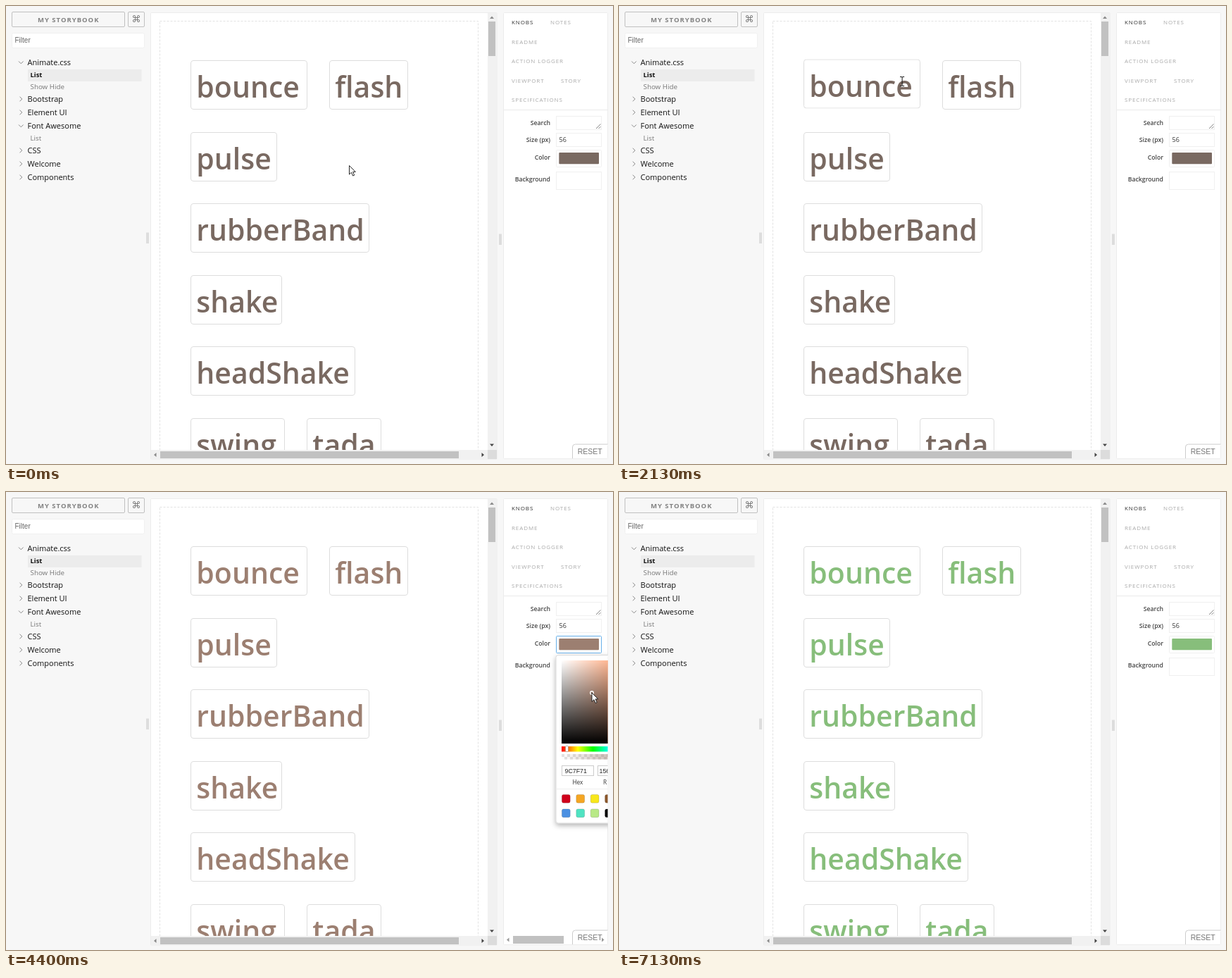
These frames come from a looping animation (862 by 650 pixels, 7790 ms). An HTML page:

```html
<!DOCTYPE html>
<html lang="en">
<head>
<meta charset="utf-8">
<title>Component explorer</title>
<style>
html, body { margin: 0; width: 100%; height: 100%; overflow: hidden; background: #f7f7f7; }
svg { display: block; }
text { font-family: "Open Sans", "Noto Sans", sans-serif; white-space: pre; }
.arial { font-family: "Liberation Sans", Arial, sans-serif; }
.tag text { font-size: 41px; font-weight: 600; fill: currentColor; }
.tag rect { fill: #fff; stroke: #ddd; }
.tag { transform-box: fill-box; transform-origin: center; }
.item { font-size: 11px; fill: #111; }
.sub { font-size: 9.8px; fill: #777; }
.tab { font-size: 8px; letter-spacing: .9px; fill: #aaa; }
.label { font-size: 8.7px; font-weight: 600; fill: #444; text-anchor: end; }
.field { fill: #fff; stroke: #f0f0f0; }
.entry { fill: #fff; stroke: #ccc; }
.panel { fill: #fff; stroke: #ececec; }
.track { fill: #f1f1f1; }
.thumb { fill: #c1c1c1; }
.chevron { fill: none; stroke: #888; }
.cursor { fill: #fff; stroke: #111; stroke-width: .9; stroke-linejoin: round; }
</style>
</head>
<body>
<svg id="stage" width="862" height="650" viewBox="0 0 862 650">
  <defs>
    <clipPath id="viewClip"><rect x="206" y="10" width="478" height="620"/></clipPath>
    <clipPath id="sideClip"><rect x="707" y="10" width="147.5" height="632"/></clipPath>
    <linearGradient id="white"><stop stop-color="#fff"/><stop offset="1" stop-color="#fff" stop-opacity="0"/></linearGradient>
    <linearGradient id="black" x1="0" y1="1" x2="0" y2="0"><stop/><stop offset="1" stop-opacity="0"/></linearGradient>
    <linearGradient id="hues">
      <stop stop-color="#f00"/><stop offset=".17" stop-color="#ff0"/><stop offset=".33" stop-color="#0f0"/>
      <stop offset=".5" stop-color="#0ff"/><stop offset=".67" stop-color="#00f"/><stop offset=".83" stop-color="#f0f"/><stop offset="1" stop-color="#f00"/>
    </linearGradient>
    <linearGradient id="alpha"><stop stop-color="currentColor" stop-opacity="0"/><stop offset="1" stop-color="currentColor"/></linearGradient>
    <pattern id="checks" x="789" y="372" width="8" height="8" patternUnits="userSpaceOnUse">
      <rect width="8" height="8" fill="#fff"/><path d="M0 0h4v8h4V4H0z" fill="#e2e2e2"/>
    </pattern>
    <filter id="shadow" x="-20%" y="-20%" width="140%" height="140%">
      <feDropShadow dx="0" dy="3" stdDeviation="3.5" flood-opacity=".3"/>
    </filter>
  </defs>

  <rect width="862" height="650" fill="#f7f7f7"/>

  <!-- navigation -->
  <g fill="#f7f7f7" stroke="#c1c1c1">
    <rect x="8.5" y="8.5" width="160" height="21" rx="1.5"/>
    <rect x="173.5" y="8.5" width="23" height="21" rx="1.5"/>
  </g>
  <text x="45" y="22.7" font-size="9.5" font-weight="700" letter-spacing="1" fill="#828282">MY STORYBOOK</text>
  <text x="184.8" y="23.2" font-size="13" text-anchor="middle" fill="#777" style="font-family:'DejaVu Sans',sans-serif">⌘</text>
  <rect x="8.5" y="38.5" width="188" height="21" rx="2" class="field"/>
  <text class="arial" x="12.5" y="52" font-size="10" fill="#666">Filter</text>
  <rect x="31" y="90" width="161.5" height="17" fill="#ececec"/>
  <g id="tree"></g>
  <path d="M199 321.5h4V337h-4zM700 323.5h4V339h-4z" fill="#ddd"/>

  <!-- preview -->
  <rect class="panel" x="205.5" y="9.5" width="491.5" height="633.5" rx="1"/>
  <g clip-path="url(#viewClip)">
    <rect x="218.5" y="21.5" width="452" height="700" fill="none" stroke="#e2e2e2" stroke-dasharray="3 2"/>
    <g id="tags"></g>
  </g>
  <path class="track" d="M684 10h13v620h-13zM206 630h478v13H206z"/>
  <rect x="684" y="630" width="13" height="13" fill="#dcdcdc"/>
  <path class="thumb" d="M685 22h10v49h-10zM219 632h424v10H219z"/>
  <path d="M687 18h6l-3-3.5zM213.5 634v6l-3.5-3z" fill="#8a8a8a"/>
  <path d="M687 621.5h6l-3 3.5zM675.5 634v6l3.5-3z" fill="#444"/>

  <!-- addons -->
  <rect class="panel" x="706.5" y="9.5" width="148" height="633" rx="1"/>
  <path d="M707 147.5h147" stroke="#eaeaea"/>
  <g id="tabs"></g>
  <g id="labels"></g>
  <g class="field">
    <rect x="781.5" y="156.5" width="64" height="19"/>
    <rect x="781.5" y="180.5" width="64" height="19"/>
    <rect id="colorField" x="781.5" y="204.5" width="64" height="24" rx="1"/>
    <rect x="781.5" y="235.5" width="64" height="25"/>
  </g>
  <path d="M838 174l6.5-6.5M841.5 174l3-3" stroke="#777" stroke-width=".9"/>
  <text x="785.5" y="193.3" font-size="9" fill="#333">56</text>
  <rect x="785.3" y="208" width="56.7" height="16.3" rx="1" fill="currentColor"/>
  <g clip-path="url(#sideClip)">
    <path d="M804.5 643v-17q0-4 4-4H860" fill="#fff" stroke="#ccc"/>
    <text class="arial" x="811.7" y="636" font-size="10.5" fill="#777">RESET</text>
    <g id="popup">
      <rect class="thumb" x="720" y="630" width="72" height="11"/>
      <path d="M714.5 632.5v6l-3.5-3zM846 632.5v6l3.5-3z" fill="#999"/>
      <rect x="781" y="231.5" width="172" height="238.5" rx="3" fill="#fff" stroke="#d0d0d0" stroke-width=".8" filter="url(#shadow)"/>
      <rect id="shade" x="789" y="239" width="156" height="118"/>
      <rect x="789" y="239" width="156" height="118" fill="url(#white)"/>
      <rect x="789" y="239" width="156" height="118" fill="url(#black)"/>
      <circle id="marker" r="2.3" fill="none" stroke="#fff" stroke-width="1.3"/>
      <rect x="789" y="361" width="135" height="7.5" fill="url(#hues)"/>
      <rect id="huePin" y="360.5" width="4" height="8" rx="1" fill="#fff" stroke="#777" stroke-width=".5"/>
      <rect x="789" y="372" width="135" height="7.5" fill="url(#checks)"/>
      <rect x="789" y="372" width="135" height="7.5" fill="url(#alpha)"/>
      <rect class="entry" x="789.5" y="388.5" width="45" height="14"/>
      <rect class="entry" x="840.5" y="388.5" width="26" height="14"/>
      <g font-size="8.8" fill="#222">
        <text class="arial" id="hex" x="793.5" y="399"></text>
        <text class="arial" id="red" x="842.5" y="399"></text>
      </g>
      <g font-size="8.3" fill="#333"><text x="804.5" y="415">Hex</text><text x="848" y="415">R</text></g>
      <path d="M782 421.5h80" stroke="#eee"/>
      <g id="presets" stroke="#000" stroke-opacity=".18" stroke-width=".8"></g>
    </g>
  </g>

  <g id="cursor" class="cursor">
    <path d="M.5.5V13l3-2.8 2.1 4.8 2.1-.9-2.1-4.7H9.3z"/>
    <path d="M-3-6.5H-1L0-6 1-6.5H3M0-6V6M-3 6.5H-1L0 6 1 6.5H3" fill="none" stroke-width="1"/>
    <path d="M-1.5.5q1.5-1.5 2.7 0v5q2-.8 2.4.6 2-.6 2.4.7 1.8-.3 1.8 1.5v4q0 2-1.3 3.5V18H-.5v-1.7L-4.8 11q-.9-2 .8-2.2l2.5 1.9z"/>
  </g>
</svg>
<script>
const LOOP = 7790, FRAME = 1000 / 15, OPEN = 3667, HUE_CLICK = 5267, CLOSE = 6467;
const $ = id => document.getElementById(id);

function add(parent, name, attrs, content) {
  const el = document.createElementNS("http://www.w3.org/2000/svg", name);
  for (const key in attrs) el.setAttribute(key, attrs[key]);
  if (content) el.textContent = content;
  return parent.appendChild(el);
}
const label = (id, cls, x, y, text, style = "") => add($(id), "text", { class: cls, x, y, style }, text);

for (const [text, y, open] of [["Animate.css", 84, 1], ["Bootstrap", 136], ["Element UI", 155],
  ["Font Awesome", 174, 1], ["CSS", 209], ["Welcome", 228], ["Components", 247]]) {
  label("tree", "item", 30.5, y, text);
  add($("tree"), "path", { class: "chevron", d: open ? `M18 ${y - 5.5}l3.3 3.3 3.3-3.3` : `M19.5 ${y - 7.3}l3.3 3.3-3.3 3.3` });
}
label("tree", "sub", 34.5, 101.3, "List", "font-weight:700;font-size:9.4px;fill:#111");
label("tree", "sub", 34.5, 118, "Show Hide");
label("tree", "sub", 34.5, 191, "List");

for (const [text, x, y] of [["KNOBS", 718, 26], ["NOTES", 773, 26], ["README", 718, 53.5],
  ["ACTION LOGGER", 718, 81], ["VIEWPORT", 718, 108.5], ["STORY", 788, 108.5], ["SPECIFICATIONS", 718, 136]])
  label("tabs", "tab", x, y, text, text === "KNOBS" ? "fill:#333" : "");

for (const [text, y] of [["Search", 169.3], ["Size (px)", 193.3], ["Color", 218], ["Background", 249.3]])
  label("labels", "label", 773, y, text);

const tags = {};
for (const [name, x, y, width] of [["bounce", 262, 77, 166], ["flash", 459, 77, 112], ["pulse", 262, 179, 123],
  ["rubberBand", 262, 280, 254], ["shake", 262, 382, 130], ["headShake", 262, 483, 234],
  ["swing", 262, 585, 134], ["tada", 427, 585, 106]]) {
  const g = tags[name] = add($("tags"), "g", { class: "tag" });
  add(g, "rect", { x: x + .5, y: y + .5, width: width - 1, height: 69, rx: 3.5 });
  add(g, "text", { x: x + 8.3, y: y + 53.2 }, name);
}

["#d0021b", "#f5a623", "#f8e71c", "#8b572a", "#4a90e2", "#50e3c2", "#b8e986", "#000"].forEach((fill, i) =>
  add($("presets"), "rect", { x: 789.4 + i % 4 * 20.4, y: i < 4 ? 429.4 : 449.9, width: 11.8, height: 11.8, rx: 2.3, fill }));

// Hover effects, active from pointer entry to pointer exit
const OUT = "cubic-bezier(.215,.61,.355,1)", IN = "cubic-bezier(.755,.05,.855,.06)";
const lift = (offset, y, easing = OUT) => ({ offset, easing, transform: `translateY(${-y}px)` });
const fade = opacity => ({ opacity, easing: "ease" });
const grow = s => ({ transform: `scale(${s})`, easing: "ease" });
const hovers = [
  ["pulse", 1060, 1240, [grow(1), grow(1.05), grow(1)]],
  ["bounce", 1315, 2315, [lift(0, 0), lift(.2, 0), lift(.4, 24, IN), lift(.43, 24, IN), lift(.53, 0),
    lift(.7, 12, IN), lift(.8, 0), lift(.9, 3.2), lift(1, 0)]],
  ["flash", 2250, 2990, [fade(1), fade(0), fade(1), fade(0), fade(1)]]
].map(([name, from, to, frames]) => {
  const anim = tags[name].animate(frames, 1000);
  anim.pause();
  return { anim, from, to };
});

// Pointer path: time, x, y, shape (0 arrow, 1 text, 2 hand)
const path = [
  [733, 487, 226, 0], [933, 440, 258, 0], [1067, 384, 240, 1], [1200, 374, 185, 0], [1333, 380, 142, 1],
  [1467, 389.5, 106, 1], [1600, 391, 106, 1], [2000, 394, 106, 1], [2133, 402, 107, 1], [2200, 427, 108, 0], [2267, 462, 110, 1],
  [2400, 486, 114, 1], [2600, 490, 115, 1], [2867, 491, 115, 1], [2933, 530, 126, 1], [3000, 592, 148, 0],
  [3133, 764, 201, 0], [3200, 788, 209, 2], [3333, 810, 216, 2], [3533, 815.5, 216, 2], [3933, 815.5, 216, 2],
  [4067, 817, 248, 0], [4267, 820, 301, 0], [4533, 843, 268, 0], [4733, 844, 349, 0], [4933, 827, 361, 0],
  [5133, 830, 363, 0], [5600, 830, 363, 0], [5667, 834, 361, 0], [6000, 753, 354, 0], [6600, 753, 354, 0], [7133, 33, 652, 0]
];
const mix = (a, b, p) => a + (b - a) * Math.min(1, Math.max(0, p));

function pointer(t) {
  const i = Math.max(0, path.findLastIndex(p => p[0] <= t + 1));
  const a = path[i], b = path[i + 1] || a;
  const p = b === a ? 0 : (t - a[0]) / (b[0] - a[0]);
  return [mix(a[1], b[1], p), mix(a[2], b[2], p), a[3]];
}

function hsvToRgb(h, s, v) {
  return [5, 3, 1].map(n => {
    const k = (n + h / 60) % 6;
    return Math.round(255 * v * (1 - s * Math.max(0, Math.min(k, 4 - k, 1))));
  });
}

function render(t) {
  for (const { anim, from, to } of hovers) anim.currentTime = t >= from && t < to ? t - from : 0;

  const [x, y, shape] = pointer(t);
  $("cursor").setAttribute("transform", `translate(${x} ${y})`);
  [...$("cursor").children].forEach((el, i) => el.style.display = i === shape ? "" : "none");

  const drag = (t - 4267) / 266, hue = t >= HUE_CLICK - 1 ? 109.25 : 20;
  const sat = mix(24 / 121, 67 / 190, drag), val = mix(121, 190, drag) / 255;
  const rgb = hsvToRgb(hue, sat, val);
  $("stage").style.color = `rgb(${rgb})`;

  const open = t >= OPEN - 1 && t < CLOSE - 1;
  $("popup").style.display = open ? "" : "none";
  $("colorField").style.stroke = open ? "#66afe9" : "";
  $("shade").setAttribute("fill", `hsl(${hue} 100% 50%)`);
  $("marker").setAttribute("cx", 789 + sat * 156);
  $("marker").setAttribute("cy", 239 + (1 - val) * 118);
  $("huePin").setAttribute("x", 787 + hue / 360 * 135);
  $("hex").textContent = rgb.map(c => c.toString(16).padStart(2, "0")).join("").toUpperCase();
  $("red").textContent = rgb[0];
}

const start = performance.now();
function tick() {
  const t = (performance.now() - start) % LOOP;
  render(Math.floor((t + 3.4) / FRAME) * FRAME);
  requestAnimationFrame(tick);
}
tick();
</script>
</body>
</html>
```
